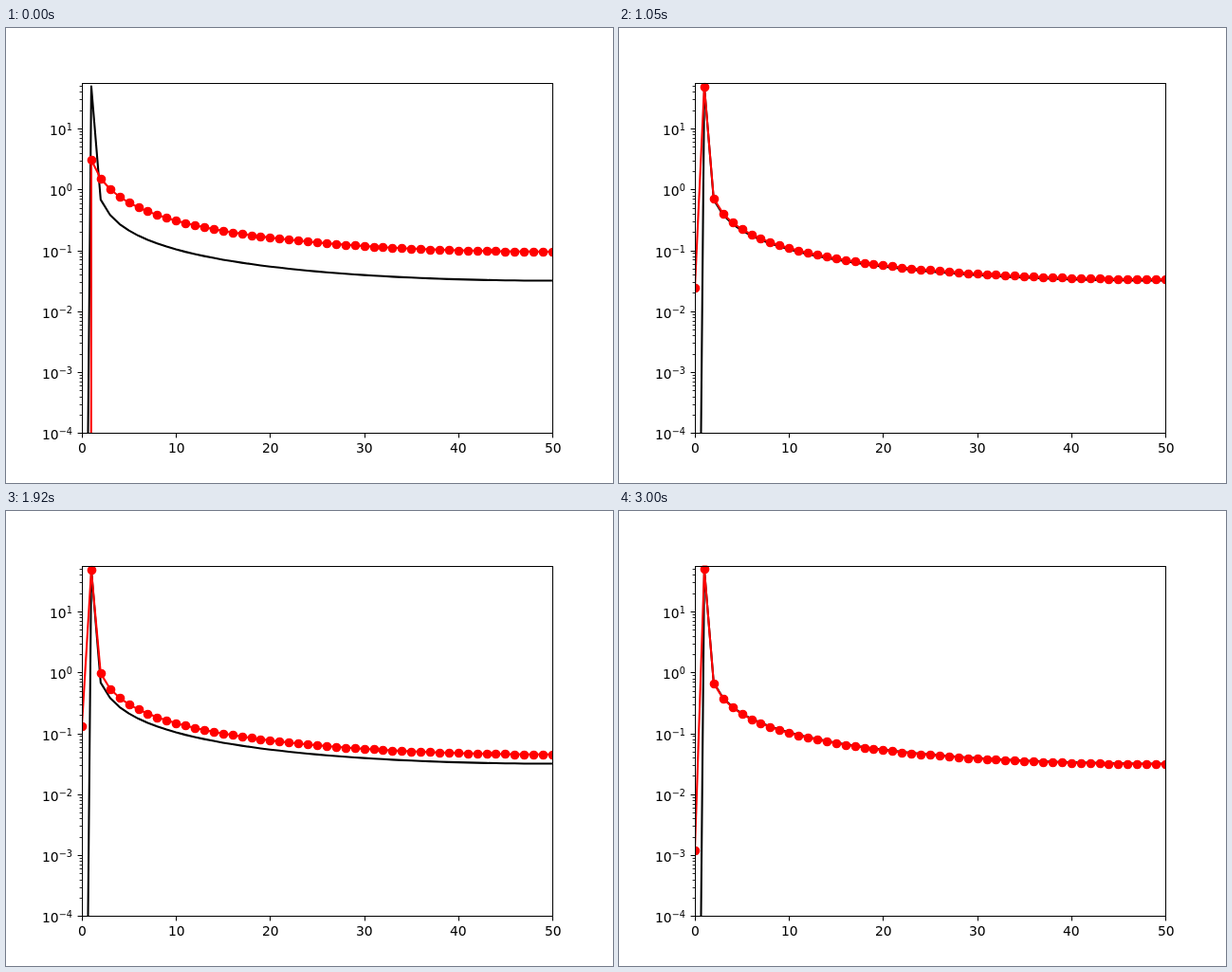
An HTML page that plays this animation: 640 px wide and 480 px high, repeating every 3.03 s.

```html
<!DOCTYPE html>
<html lang="en">
<head>
<meta charset="utf-8">
<title>Spectrum</title>
<style>
html, body { margin: 0; width: 100%; height: 100%; overflow: hidden; background: #fff; }
svg { display: block; width: 640px; height: 480px; }
text { font: 13.89px "DejaVu Sans", sans-serif; fill: #000; }
.exp { font-size: 9.72px; }
</style>
</head>
<body>
<svg id="plot" viewBox="0 0 640 480">
  <clipPath id="area"><rect x="80" y="57.6" width="496" height="369.6"/></clipPath>
  <g clip-path="url(#area)" fill="none" stroke-width="2.083" stroke-linejoin="round">
    <path id="target" stroke="#000"/>
    <path id="fit" stroke="#f00"/>
    <path id="dots" fill="#f00" stroke="none"/>
  </g>
  <path id="ticks" stroke="#000" fill="none"/>
  <path id="minor" stroke="#000" stroke-width="0.83" fill="none"/>
  <rect x="80.5" y="58.5" width="496" height="369" fill="none" stroke="#000"/>
  <g id="labels"></g>
</svg>
<script>
const FRAME = 30, COUNT = 101, BINS = 50, DECADE = 64.22, PEAK = 49.6;
const el = id => document.getElementById(id);
const xPos = k => 80 + k * 9.92;
const yPos = log => 427.2 - (log + 4) * DECADE;
const snap = v => Math.round(v) + 0.5;

// Fast convergence from a straight ramp to a sine, then a slowly growing wobble
function stateAt(frame) {
  const young = Math.exp(-frame / 1.8);
  const swell = 1 - Math.exp(-((frame / 41) ** 4));
  const wobble = 0.45 * swell * Math.sin(2 * Math.PI * (frame - 58) / 42.3);
  return {
    scale: Math.exp(wobble) + 2 * Math.exp(-frame / 3),
    share: 1 - young,
    peak: PEAK - 46.55 * young - 5 * Math.max(0, wobble),
    mean: Math.abs(0.36 * wobble + 0.006) * (1 - young)
  };
}

// Spectral leakage of one sine period spread over 100 samples, both ends included
function spectrum({ scale, share, peak, mean }) {
  const w = 2 * Math.PI / 99, points = [];
  for (let k = 0; k <= BINS; k++) {
    const s = Math.sin(Math.PI * k / 100);
    const tail = Math.sin(w) / (2 * s) / (1 - share * (Math.sin(w / 2) / s) ** 2);
    const value = k === 0 ? mean : k === 1 ? peak : scale * tail;
    points.push([xPos(k), yPos(Math.log10(Math.max(value, 1e-300)))]);
  }
  return points;
}

const linePath = pts => "M" + pts.map(p => p[0].toFixed(2) + "," + p[1].toFixed(2)).join("L");

function dotPath(pts) {
  const r = 4.86;
  return pts.map(([x, y]) =>
    `M${snap(x) - r},${snap(y)}a${r},${r} 0 1 0 ${2 * r},0a${r},${r} 0 1 0 ${-2 * r},0`
  ).join("");
}

function label(x, y, text, cls = "") {
  const t = document.createElementNS("http://www.w3.org/2000/svg", "text");
  t.setAttribute("x", x);
  t.setAttribute("y", y);
  t.setAttribute("class", cls);
  t.textContent = text;
  el("labels").append(t);
}

function drawAxes() {
  const digit = 8.84;
  let major = "", minor = "";
  for (let v = 0; v <= 50; v += 10) {
    major += `M${snap(xPos(v))},428v4.4`;
    label(Math.ceil(xPos(v) - digit * String(v).length / 2), 448, v);
  }
  for (let e = -4; e <= 1; e++) {
    const y = snap(yPos(e)), left = e < 0 ? 38 : 46;
    major += `M80,${y}h-4.4`;
    label(left, y + 6.5, "10");
    label(left + 2 * digit, y + 1.2, String(e).replace("-", "\u2212"), "exp");
    for (let m = 2; m <= (e === 1 ? 5 : 9); m++) {
      minor += `M80,${snap(yPos(e + Math.log10(m)))}h-2.4`;
    }
  }
  el("ticks").setAttribute("d", major);
  el("minor").setAttribute("d", minor);
  const sine = { scale: 1, share: 1, peak: PEAK, mean: 1.6e-15 };
  el("target").setAttribute("d", linePath(spectrum(sine)));
}

let shown = -1;
function draw() {
  const frame = Math.floor(performance.now() / FRAME) % COUNT;
  if (frame !== shown) {
    const pts = spectrum(stateAt(frame));
    el("fit").setAttribute("d", linePath(pts));
    el("dots").setAttribute("d", dotPath(pts));
    shown = frame;
  }
  requestAnimationFrame(draw);
}

drawAxes();
draw();
</script>
</body>
</html>
```
